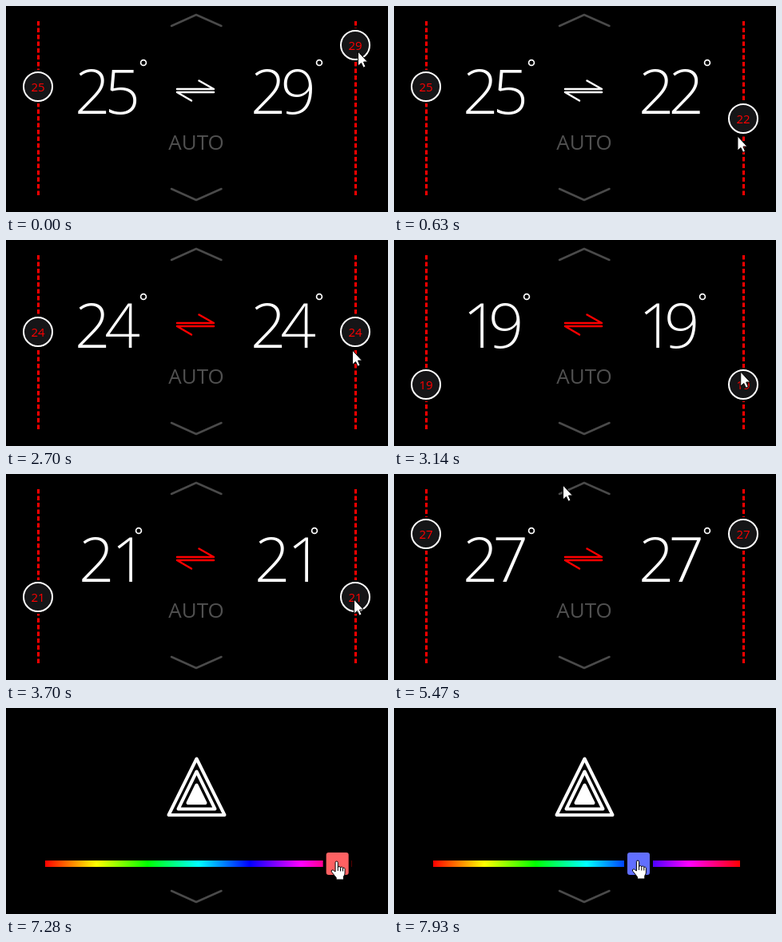
An HTML page that plays this animation: 478 px wide and 258 px high, repeating every 7990 ms.

```html
<!DOCTYPE html>
<html lang="en">
<head>
<meta charset="utf-8">
<title>Climate control</title>
<style>
  html, body { margin: 0; width: 100%; height: 100%; overflow: hidden; background: #000; }
  svg { display: block; width: 478px; height: 258px; }
  text { font-family: "Open Sans", "Noto Sans", sans-serif; }
  .big { font-size: 78px; font-weight: 300; fill: #fff; }
  .small { font-size: 15px; fill: red; text-anchor: middle; }
  .line { fill: none; stroke-width: 2.5; stroke-linejoin: round; stroke-linecap: round; }
  .gray { stroke: #4a4a4a; }
</style>
</head>
<body>
<svg viewBox="0 0 478 258">
  <defs>
    <linearGradient id="rainbow"></linearGradient>
    <g id="zone">
      <path d="M40.5 19V237" stroke="red" stroke-width="3" stroke-dasharray="5.5 3"/>
      <g class="knob">
        <path d="M37-21h7v42h-7z"/>
        <circle cx="40" r="18" fill="#151517" stroke="#fff" stroke-width="2"/>
        <text class="small" x="40" y="5.5"></text>
      </g>
      <text class="big" y="134.5"></text>
      <circle class="degree" cy="71" r="3.4" fill="none" stroke="#fff" stroke-width="1.7"/>
    </g>
  </defs>

  <g id="climate">
    <g id="left"></g>
    <g id="right"></g>
    <path id="sync" class="line" d="M241.5 93.5L260 104H214M232 118.5L214 108H260"/>
    <text x="238" y="179.5" font-size="26" fill="#505050" text-anchor="middle">AUTO</text>
  </g>

  <g id="light">
    <g fill="none" stroke="#fff" stroke-width="4" stroke-linejoin="round">
      <path d="M238.5 63.5L203.5 134H273.5Z"/>
      <path d="M238.5 79.5L215.5 126.5H261.5Z"/>
      <path d="M238.5 96.5L227.5 119H249.5Z" fill="#fff"/>
    </g>
    <rect x="49" y="191" width="384" height="8" fill="url(#rainbow)"/>
    <g id="thumb">
      <path d="M-18 190h36v10h-36z"/>
      <rect x="-14" y="181" width="28" height="28" rx="3"/>
    </g>
  </g>

  <path id="up" class="line gray" d="M207 25L238 11L269.5 25"/>
  <path class="line gray" d="M207 229L238 243L269.5 229"/>

  <g id="cursor" fill="#fff" stroke="#000">
    <path id="arrow" d="M-.5-1V17L3.5 13.5L6.2 19.2L9 18L6.5 12H11.5Z"/>
    <path id="hand" d="M-1.6 13V1.6a1.6 1.6 0 0 1 3.2 0V8a1.6 1.6 0 0 1 3.2 .3a1.5 1.5 0 0 1 3 .6a1.4 1.4 0 0 1 2.6 .8V15q0 2-1.6 4V23H-.5V20.5L-6.2 13.4q-1-1.6 .3-2.4q1.3-.6 2.6 .8ZM1.6 8v4M4.8 8.5v4M7.8 9v3.5"/>
  </g>
</svg>
<script>
const LOOP = 7990, SYNC = 2070, SWIPE = 5870, GRAB = 7260, LAG = 60;
const STEP = 13.2; // track pixels per degree
const $ = id => document.getElementById(id);
const clamp = (v, lo, hi) => Math.min(hi, Math.max(lo, v));
const move = (el, x, y) => el.setAttribute("transform", `translate(${x} ${y})`);
const show = (el, on) => el.setAttribute("visibility", on ? "visible" : "hidden");

// Pointer gestures: start, end, target x, target y
const gestures = [
  [60, 120, 440, 55],
  [200, 760, 429, 181],                        // drag the right knob down
  [1060, 1400, 188, 112], [1400, 1580, 246, 97],
  [2210, 2520, 434, 107],                      // drag both knobs
  [2520, 2960, 434, 194], [3008, 3420, 435, 80], [3420, 3660, 436, 158],
  [3900, 4150, 436, 82],
  [4970, 5320, 153, 34], [5320, 5470, 212, 15], [5470, 5670, 237, 19],
  [6240, 6620, 358, 188], [6660, 7040, 414, 192],
  [GRAB, 7930, 305, 191]                       // drag the colour thumb
];

function pointer(t) {
  let x = 441, y = 58;
  for (const [start, end, toX, toY] of gestures) {
    const p = clamp((t - start) / (end - start), 0, 1), e = p * p * (3 - 2 * p);
    x += (toX - x) * e;
    y += (toY - y) * e;
  }
  return [x, y];
}

// The dragged knob follows the pointer a moment later and snaps to whole degrees
function dragged(t) {
  const held = t < SYNC ? clamp(t - LAG, 0, 760) : clamp(t - LAG, 2520, 4150);
  return Math.round(29 - (pointer(held)[1] - 5 - 49) / STEP);
}

function makeZone(id, numberX, trackX) {
  const root = $(id);
  root.innerHTML = $("zone").innerHTML;
  const [knob, small, big, degree] =
    [".knob", ".small", ".big", ".degree"].map(s => root.querySelector(s));
  move(root, trackX, 0);
  return value => {
    const teen = value < 20, endsInOne = value % 10 === 1;
    const first = numberX + (endsInOne ? 5 : 0);
    const advance = teen ? 32 : endsInOne ? 41 : 37.5;
    move(knob, 0, Math.floor(49 + (29 - value) * STEP));
    small.textContent = big.textContent = value;
    big.setAttribute("x", `${first} ${first + advance}`);
    degree.setAttribute("cx", numberX + (teen || endsInOne ? 80 : 86));
  };
}

const setLeft = makeZone("left", 86, 0);
const setRight = makeZone("right", -91, 397);

for (let i = 0; i <= 6; i++)
  $("rainbow").innerHTML += `<stop offset="${i / 6}" stop-color="hsl(${i * 60}, 100%, 50%)"/>`;

function draw() {
  const t = performance.now() % LOOP;
  const [x, y] = pointer(t), temp = dragged(t);

  setLeft(t < SYNC ? 25 : temp);
  setRight(temp);
  $("sync").setAttribute("stroke", t < SYNC ? "#fff" : "red");

  const slide = Math.round(258 * (1 - (1 - clamp((t - SWIPE) / 390, 0, 1)) ** 3));
  move($("climate"), 0, slide);
  move($("light"), 0, slide - 258);
  show($("up"), t < SWIPE);

  const held = t > GRAB, thumbX = held ? x + 1 : 415;
  move($("thumb"), thumbX, 0);
  $("thumb").lastElementChild.setAttribute("fill",
    `hsl(${360 - (415 - thumbX) * 1.15}, 100%, ${held ? 69 : 50}%)`);

  const overThumb = t > SWIPE && Math.abs(x - thumbX) < 14 && y > 181;
  show($("arrow"), !overThumb);
  show($("hand"), overThumb);
  move($("cursor"), x, y);
  requestAnimationFrame(draw);
}
draw();
</script>
</body>
</html>
```
